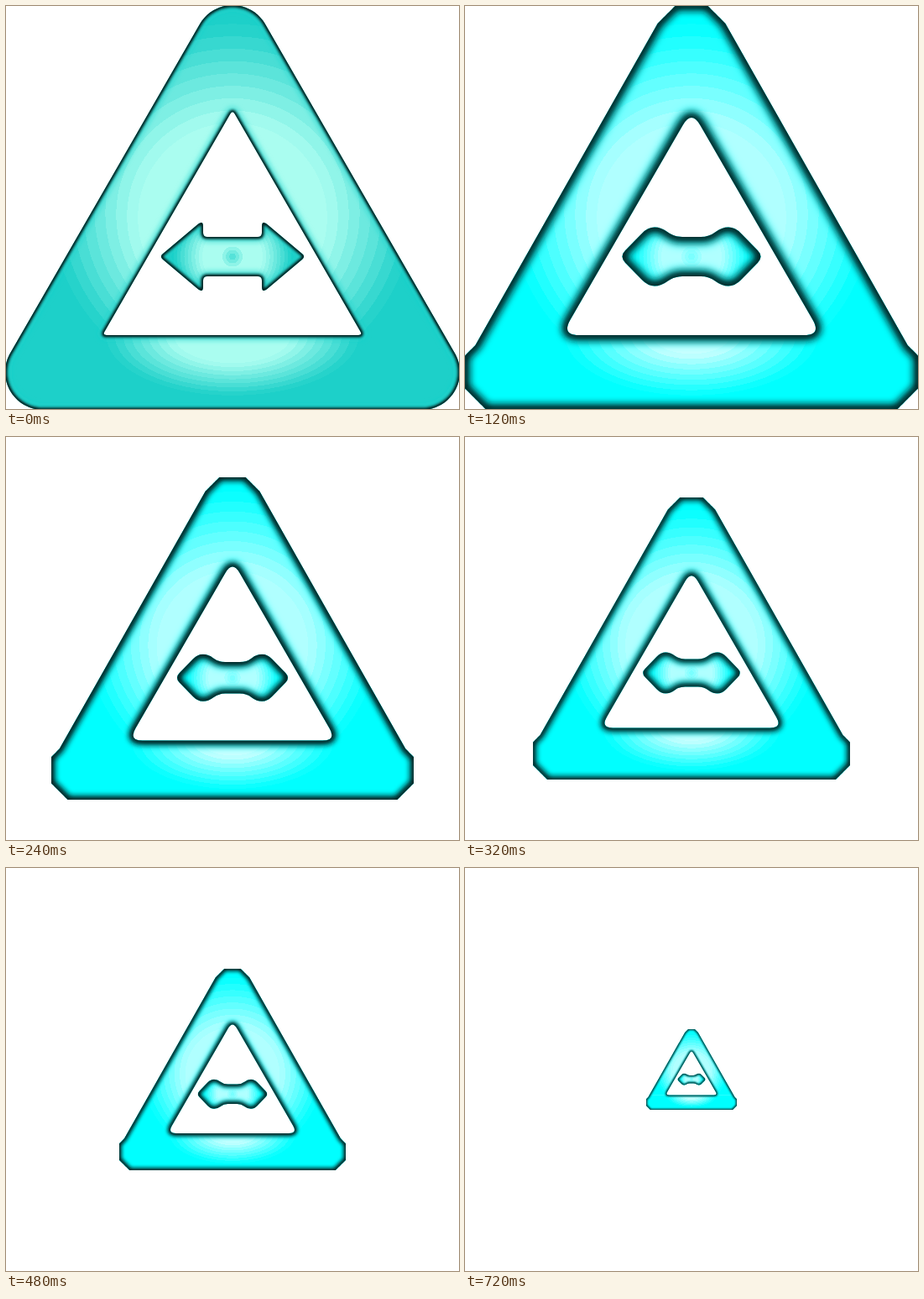
Recreate the animation shown at these times as an HTML page. Size 540x480 px, loop 0.76 s.

```html
<!DOCTYPE html>
<html>
<head>
<meta charset="utf-8">
<title>Shrinking triangle</title>
<style>
  html, body { margin: 0; width: 100%; height: 100%; overflow: hidden; background: #fff; }
  svg { display: block; width: 540px; height: 480px; }
  .halo, .edge { fill: none; }
  .halo { filter: url(#wide); }
  .edge { filter: url(#tight); stroke: #001212; }
</style>
</head>
<body>
<svg viewBox="0 0 540 480">
  <defs>
    <path id="ring"/>
    <path id="arrow"/>
    <clipPath id="box"><rect width="540" height="480"/></clipPath>
    <clipPath id="ringClip"><use href="#ring" clip-rule="evenodd"/></clipPath>
    <clipPath id="arrowClip"><use href="#arrow"/></clipPath>
    <radialGradient id="upper" gradientUnits="userSpaceOnUse" cx="270" cy="235" r="235" fx="270" fy="268"/>
    <radialGradient id="lower" gradientUnits="userSpaceOnUse" cx="0" cy="0" r="1"
      gradientTransform="translate(270 392) scale(155 74)"/>
    <radialGradient id="middle" gradientUnits="userSpaceOnUse" cx="270" cy="298.5" r="80"/>
    <filter id="wide" filterUnits="userSpaceOnUse" x="-40" y="-40" width="620" height="560">
      <feGaussianBlur/>
    </filter>
    <filter id="tight" filterUnits="userSpaceOnUse" x="-40" y="-40" width="620" height="560">
      <feGaussianBlur/>
    </filter>
  </defs>
  <g id="sign">
    <g clip-path="url(#box)">
      <g clip-path="url(#ringClip)">
        <rect width="540" height="393" fill="url(#upper)"/>
        <rect y="392" width="540" height="88" fill="url(#lower)"/>
        <use href="#ring" class="halo"/>
        <use href="#ring" class="edge"/>
      </g>
      <g clip-path="url(#arrowClip)">
        <rect x="170" y="240" width="200" height="120" fill="url(#middle)"/>
        <use href="#arrow" class="halo"/>
        <use href="#arrow" class="edge"/>
      </g>
    </g>
  </g>
</svg>
<script>
const STEP = 40, LOOP = 760, MID = 298.5, RAD = Math.PI / 180;
const $ = id => document.getElementById(id);
const mix = (a, b, k) => a + (b - a) * k;
const mixAll = (p, q, k) => p.map((v, i) => mix(v, q[i], k));
const flip = ([x, y]) => [540 - x, y];
const fmt = p => p[0].toFixed(2) + ' ' + p[1].toFixed(2);

// Closed polygon with softened corners; each cut is d long at most.
function rounded(pts, d) {
  const n = pts.length;
  const toward = (p, q) =>
    mixAll(p, q, Math.min(0.5, d / Math.hypot(q[0] - p[0], q[1] - p[1])));
  return pts.map((p, i) => {
    const a = toward(p, pts[(i + n - 1) % n]), b = toward(p, pts[(i + 1) % n]);
    return (i ? 'L' : 'M') + fmt(a) + 'Q' + fmt(p) + ' ' + fmt(b);
  }).join('') + 'Z';
}

// Corner that turns from a circle (k = 0) into an octagon (k = 1).
function corner(x, y, from, to, k) {
  const out = [], n = 40;
  for (let i = 0; i <= n; i++) {
    const a = mix(from, to, i / n);
    const off = a - 45 * Math.round(a / 45);
    const r = 45 * mix(1, 1 / Math.cos(off * RAD), k);
    out.push([x + r * Math.cos(a * RAD), y + r * Math.sin(a * RAD)]);
  }
  return out;
}

function ringPath(k) {
  const outer = [
    ...corner(270, 44, 210, 330, k),
    ...corner(496, 436, 330 - 15 * k, 450, k),
    ...corner(44, 436, 90, 210 + 15 * k, k)
  ];
  const hole = [[270, 124], [425, 392], [115, 392]];
  return 'M' + outer.map(fmt).join('L') + 'Z' + rounded(hole, mix(5, 21, k));
}

// Mirrors the upper left quarter of the arrow twice.
function arrowPath(k) {
  const sharp = [[183, MID], [231, 258], [235, 258], [235, 275]];
  const blunt = [[184, MID], [218, 263.5], [234, 263.5], [249, 275]];
  const quarter = sharp.map((p, i) => mixAll(p, blunt[i], k));
  const top = [...quarter, ...quarter.map(flip).reverse()];
  const low = top.slice(1, -1).map(([x, y]) => [x, 2 * MID - y]).reverse();
  return rounded([...top, ...low], mix(5, 10, k));
}

// Flat bands from light to base between two radii; core tints the centre.
function paint(id, from, to, light, base, core = 0) {
  const n = 8, steps = [];
  const add = (a, b, mixBy) => {
    const rgb = mixAll(light, base, mixBy).map(Math.round);
    for (const at of [a, b]) steps.push(`<stop offset="${at}" stop-color="rgb(${rgb})"/>`);
  };
  if (core) for (let i = 0; i < 3; i++) add(i / 20, (i + 1) / 20, core * (1 - i / 3));
  add(core ? 0.15 : 0, from, 0);
  for (let i = 0; i < n; i++) add(mix(from, to, i / n), mix(from, to, (i + 1) / n), (i + 0.5) / n);
  add(to, 1, 1);
  $(id).innerHTML = steps.join('');
}

function soften(name, width, blur) {
  for (const e of document.querySelectorAll('.' + name)) e.setAttribute('stroke-width', width);
  $(name === 'halo' ? 'wide' : 'tight').firstElementChild.setAttribute('stdDeviation', blur);
}

function shape(k) {
  const base = mixAll([29, 208, 201], [0, 255, 255], k);
  const light = mixAll([170, 253, 240], [176, 255, 255], k);
  const glow = mixAll(light, [200, 255, 255], k);
  $('ring').setAttribute('d', ringPath(k));
  $('arrow').setAttribute('d', arrowPath(k));
  paint('upper', 0.48, 0.92, light, base);
  paint('lower', mix(0.45, 0.3, k), 0.97, glow, base);
  paint('middle', 0.45, 0.88, light, base, mix(0.6, 0.3, k));
  soften('halo', mix(9, 18, k), mix(3.5, 6, k));
  soften('edge', mix(5, 13, k), mix(1.8, 4.2, k));
  for (const e of document.querySelectorAll('.halo')) e.style.stroke = `rgb(${base.map(Math.round)})`;
}

let lastStep = -1, lastK = -1;
function draw(t) {
  const n = Math.floor((t % LOOP) / STEP);
  if (n === lastStep) return;
  lastStep = n;
  const k = Math.min(1, n / 3);
  if (k !== lastK) shape(lastK = k);
  const s = n < 4 ? 1 : 1.1 - n / 20;
  $('sign').setAttribute('transform', `translate(270 240) scale(${s}) translate(-270 -240)`);
}

const start = performance.now();
function tick() {
  draw(performance.now() - start);
  requestAnimationFrame(tick);
}
tick();
</script>
</body>
</html>
```
